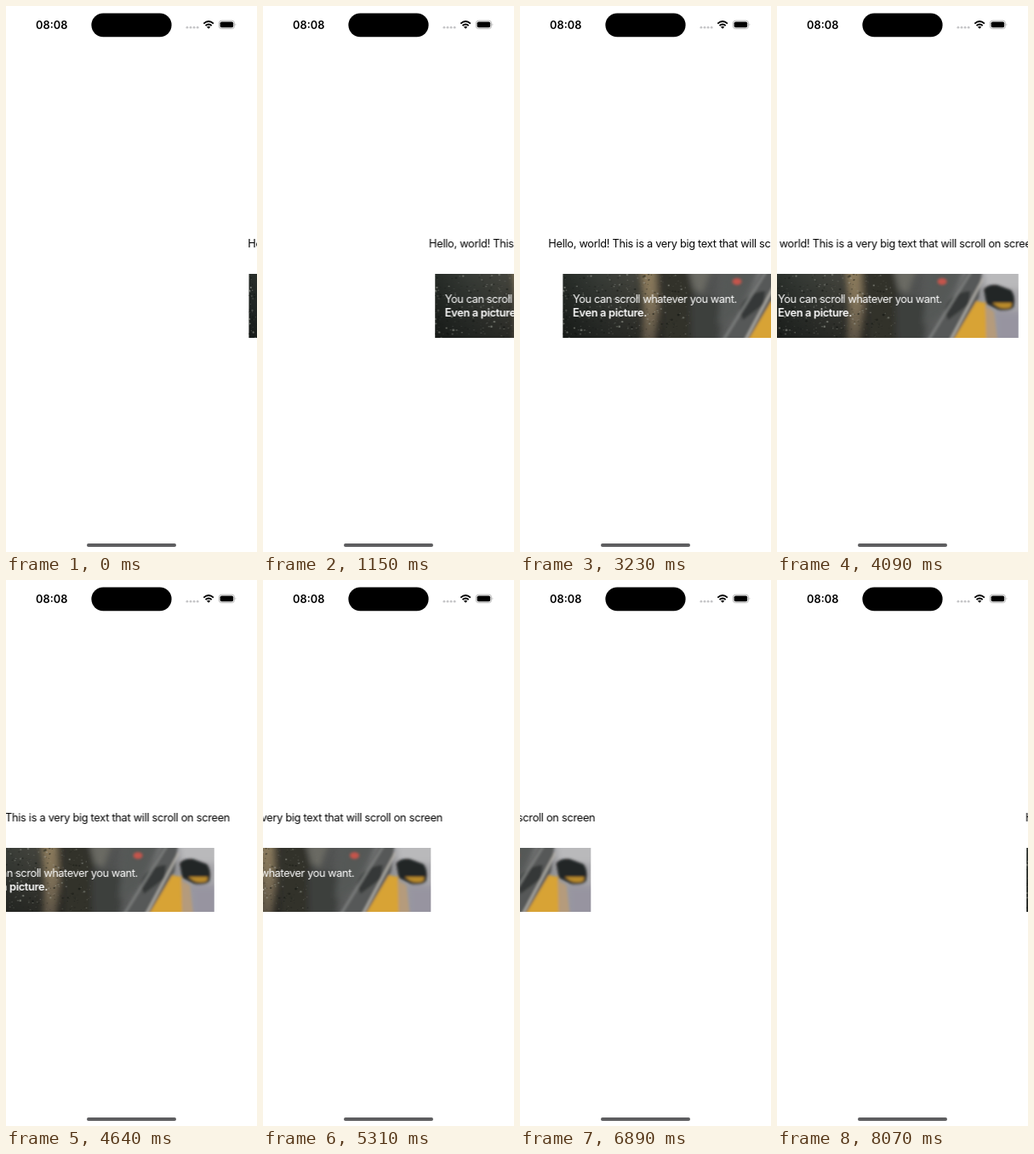
An HTML page for the animation above (8170 ms loop, 295 by 640 pixels).

```html
<!DOCTYPE html>
<html lang="en">
<head>
<meta charset="utf-8">
<title>Scrolling text and picture</title>
<style>
  html, body { margin: 0; width: 100%; height: 100%; overflow: hidden; background: #fff; }
  svg { display: block; }
  text { font: 12.76px Inter, Roboto, sans-serif; letter-spacing: -.27px; white-space: pre; }
  .semi { font-weight: 600; letter-spacing: -.3px; }
  .clock { font-weight: 600; letter-spacing: 0; text-anchor: middle; }
  .light { fill: #fff; letter-spacing: -.4px; }
  .light.semi { letter-spacing: -.3px; }
</style>
</head>
<body>
<svg id="stage" width="295" height="640" viewBox="0 0 295 640">
  <defs>
    <linearGradient id="base">
      <stop offset="0" stop-color="#262b27"/>
      <stop offset=".14" stop-color="#373b36"/>
      <stop offset=".28" stop-color="#43443d"/>
      <stop offset=".4" stop-color="#393832"/>
      <stop offset=".55" stop-color="#4a4c4b"/>
      <stop offset=".74" stop-color="#666767"/>
      <stop offset=".86" stop-color="#97979a"/>
      <stop offset="1" stop-color="#a8a7ab"/>
    </linearGradient>
    <linearGradient id="shade" x2="0" y2="1">
      <stop offset="0" stop-color="#000" stop-opacity="0"/>
      <stop offset="1" stop-color="#000" stop-opacity=".4"/>
    </linearGradient>
    <linearGradient id="post" x2="0" y2="1">
      <stop offset="0" stop-color="#8d7c5c"/>
      <stop offset=".5" stop-color="#7d6f57"/>
      <stop offset="1" stop-color="#564e41"/>
    </linearGradient>
    <filter id="soft" x="-30%" y="-30%" width="160%" height="160%"><feGaussianBlur stdDeviation="3.5"/></filter>
    <filter id="near" x="-30%" y="-30%" width="160%" height="160%"><feGaussianBlur stdDeviation="1.5"/></filter>
    <clipPath id="frame"><rect width="294.75" height="75"/></clipPath>
  </defs>

  <rect width="295" height="640" fill="#fff"/>

  <text id="line" y="282.7">Hello, world! This is a very big text that will scroll on screen</text>

  <g id="card">
    <g transform="translate(0 314)">
      <g clip-path="url(#frame)">
        <rect width="295" height="75" fill="url(#base)"/>
        <rect width="150" height="75" fill="url(#shade)"/>
        <g filter="url(#soft)">
          <path d="M91-8H110L113 40L109 83H93L95 40Z" fill="url(#post)"/>
          <path d="M114-8H146L170 83H117Z" fill="#32312c"/>
          <path d="M148-8H176L165 24L154 18Z" fill="#6b6a64"/>
          <path d="M150 26L190 30L182 83H152Z" fill="#3c3f3e"/>
          <path d="M190-8H232L204 48L182 60Z" fill="#555856"/>
          <path d="M252-8H303V18H256Z" fill="#b9b9bb"/>
          <path d="M268 44H303V83H268Z" fill="#9794a0"/>
        </g>
        <g filter="url(#near)">
          <path d="M188 83L236-5H252L248 28L216 83Z" fill="#575958"/>
          <path d="M208 43Q214 22 238 20L236 36L212 54Z" fill="#353937"/>
          <ellipse cx="205" cy="9" rx="5.5" ry="4" fill="#c4544c"/>
          <path d="M217 79L245 32L256 34L258 79Z" fill="#d8a336"/>
          <path d="M256 38L266 44L270 79H257Z" fill="#b59b7b"/>
          <path d="M188 79L240-4" stroke="#7f8180" stroke-width="2.5"/>
          <path d="M214 79L253 6" stroke="#bdbab3" stroke-width="2.2"/>
          <path d="M254 18Q259 12 270 13L286 19Q292 26 289 39Q284 44 271 42L257 35Z" fill="#222628"/>
          <path d="M264 34L287 34L286 39Q279 42 271 39Z" fill="#b98a2c"/>
        </g>
        <g id="drops"/>
      </g>
    </g>
    <text class="light" x="12" y="348.3">You can scroll whatever you want.</text>
    <text class="light semi" x="12" y="363.6">Even a picture.</text>
  </g>

  <text class="clock" x="53.7" y="26.6">08:08</text>
  <rect x="100.4" y="8.5" width="94.2" height="27.7" rx="13.85"/>
  <g fill="#c6c6c8">
    <circle cx="212.9" cy="25.2" r="1.4"/>
    <circle cx="217" cy="25.2" r="1.4"/>
    <circle cx="221.1" cy="25.2" r="1.4"/>
    <circle cx="225.2" cy="25.2" r="1.4"/>
  </g>
  <g fill="none" stroke="#000" stroke-width="1.8">
    <path d="M232.3 20.6Q238.1 15.3 243.9 20.6"/>
    <path d="M234.5 23Q238.1 19.9 241.7 23"/>
  </g>
  <path d="M236 24.6Q238.1 23 240.2 24.6L238.1 26.8Z"/>
  <rect x="250.3" y="17.2" width="18.2" height="9.4" rx="3" fill="none" stroke="#a6a6a6" stroke-width=".8"/>
  <rect x="251.6" y="18.5" width="15.6" height="6.8" rx="1.8"/>
  <path d="M269.6 20.3Q271.1 21.9 269.6 23.5Z" fill="#a6a6a6"/>
  <rect x="95" y="630.1" width="105" height="3.8" rx="1.9" fill="#5e5e60"/>
</svg>

<script>
const LOOP = 8170;

// [time, number of equal steps that lead up to it]
const BEATS = [
  [100, 1], [840, 7], [940, 1], [1690, 7], [1790, 1], [2020, 2], [2120, 1], [2530, 4],
  [2630, 1], [3230, 6], [3340, 1], [3460, 1], [4090, 6], [4190, 1], [4300, 1], [5110, 7],
  [5210, 1], [5310, 1], [5430, 1], [5930, 5], [6040, 1], [6790, 7], [6890, 1], [7010, 1],
  [7650, 6], [7750, 1], [8070, 3]
];

// [time, left edge]; a repeated time is the jump back to the right side
const LINE_PATH = [[0, 284.3], [8032, -339.8], [8032, 295], [LOOP, 284.3]];
const CARD_PATH = [
  [0, 285.3], [2020, 138.6], [3230, 50], [4090, -11], [5310, -97.5],
  [6890, -211.5], [8040, -294.75], [8040, 295], [LOOP, 285.3]
];

function stepTimes() {
  const times = [0];
  for (const [end, count] of BEATS) {
    const start = times[times.length - 1];
    for (let i = 1; i <= count; i++) {
      times.push(Math.floor((start + (end - start) * i / count) / 10) * 10);
    }
  }
  return times;
}

function leftAt(path, t) {
  const next = path.findIndex(point => point[0] > t);
  const [t0, x0] = path[next - 1];
  const [t1, x1] = path[next];
  return x0 + (x1 - x0) * (t - t0) / (t1 - t0);
}

function scroll(id, path, times) {
  const pose = (t, offset) => ({
    offset,
    transform: `translateX(${leftAt(path, t).toFixed(2)}px)`,
    easing: 'steps(1, end)'
  });
  const frames = times.map(t => pose(t, t / LOOP));
  frames.push(pose(0, 1));
  document.getElementById(id).animate(frames, { duration: LOOP, iterations: Infinity });
}

function seeded(seed) {
  return () => (seed = (seed * 16807) % 2147483647) / 2147483647;
}

function addDrops(count) {
  const random = seeded(71);
  const group = document.getElementById('drops');
  for (let i = 0; i < count; i++) {
    const drop = document.createElementNS('http://www.w3.org/2000/svg', 'circle');
    drop.setAttribute('cx', (random() ** 1.3 * 150).toFixed(1));
    drop.setAttribute('cy', (random() * 75).toFixed(1));
    drop.setAttribute('r', (0.4 + random() ** 3 * 0.9).toFixed(2));
    drop.setAttribute('fill', random() < 0.5 ? '#a5a89f' : '#0f130f');
    drop.setAttribute('opacity', (0.2 + random() * 0.45).toFixed(2));
    group.append(drop);
  }
}

addDrops(480);
const times = stepTimes();
scroll('line', LINE_PATH, times);
scroll('card', CARD_PATH, times);
</script>
</body>
</html>
```
